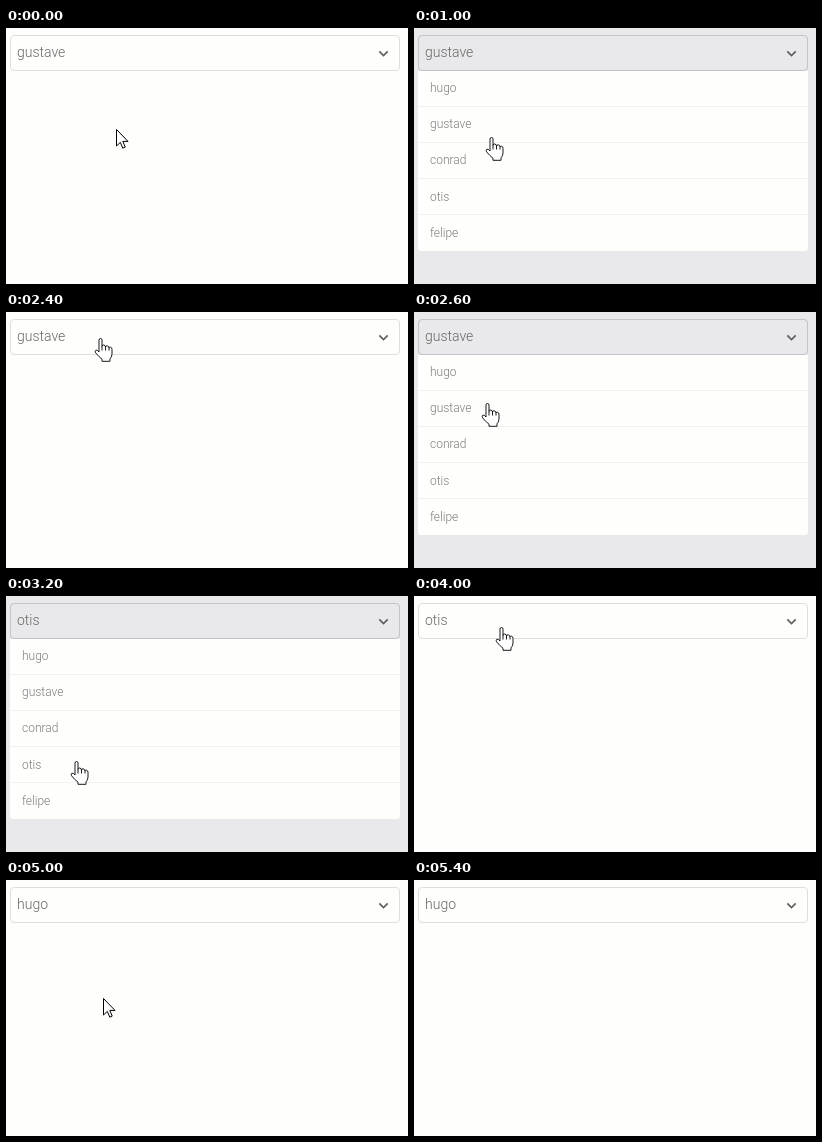
Recreate the animation shown at these times as an HTML page. Size 402 px wide and 256 px high, loop 6200 ms.

```html
<!DOCTYPE html>
<html lang="en">
<head>
<meta charset="utf-8">
<title>Select dropdown</title>
<style>
  html, body { margin: 0; width: 100%; height: 100%; overflow: hidden; background: #fefefd; }
  svg { display: block; width: 402px; height: 256px; }
  text { font-family: Roboto, "Open Sans", sans-serif; font-weight: 300; }
  #value { font-size: 14px; fill: #666; }
  #list text { font-size: 12px; fill: #7c7c7c; }
  .sep { stroke: #f1f1f1; }
  .frame { fill: none; stroke: #dededf; }
  #focus { stroke: #c4c4c7; }
  .cursor { fill: #fff; stroke: #000; stroke-linejoin: round; }
</style>
</head>
<body>
<svg viewBox="0 0 402 256">
  <rect width="402" height="256" fill="#fefefd"/>
  <rect class="menu" width="402" height="256" fill="#e9e9eb"/>
  <rect class="frame" x="4.5" y="7.5" width="389" height="35" rx="3.5"/>
  <rect class="frame menu" id="focus" x="4.5" y="7.5" width="389" height="35" rx="3.5"/>
  <text id="value" x="11" y="29"></text>
  <path d="M373.3 23.3l4.2 4.2 4.2-4.2" fill="none" stroke="#606060" stroke-width="1.7"/>
  <g class="menu" id="list">
    <path d="M4 43H394V220a3 3 0 0 1-3 3H7a3 3 0 0 1-3-3Z" fill="#fefefd"/>
  </g>
  <path id="arrow" class="cursor" d="M.5 .5V17L4.3 13.4 6.8 19.2 9.2 18.1 6.8 12.4H12Z"/>
  <path id="hand" class="cursor" stroke-width=".9" d="M-1 14V2Q-1 .5 .5 .5T2 2V8.5Q2 6.8 3.7 7T5.5 9Q5.5 7.6 7.2 7.8T9 10Q9.4 8.8 10.7 9.2T12 11.5V16Q11.8 19.3 10 20.8V23.3H2V21.2Q-1.5 18.5 -4.4 14.8Q-5.4 12.9 -4.1 12.2Q-2.6 11.7 -1 14ZM2 8.5V12.5M5.5 9V12.5M9 10V12.5"/>
</svg>
<script>
const LOOP = 6200, STEP = 200, ROW = 36;
const names = ["hugo", "gustave", "conrad", "otis", "felipe"];

// The menu fades in from open to full and out from pick to shut (ms)
const visits = [
  { open: 400, full: 800, pick: 1800, shut: 2200, row: 1 },
  { open: 2600, full: 2600, pick: 3200, shut: 3600, row: 3 },
  { open: 4000, full: 4400, pick: 4800, shut: 5000, row: 0 }
];

// Pointer stops, eased in between
const stops = [
  { at: 0, x: 110, y: 101 },
  { at: 400, x: 95, y: 30 },
  { at: 1000, x: 77, y: 109 },
  { at: 1800, x: 76, y: 97 },
  { at: 2400, x: 94, y: 26 },
  { at: 2600, x: 73, y: 91 },
  { at: 3200, x: 70, y: 165 },
  { at: 4000, x: 87, y: 31 },
  { at: 4800, x: 61, y: 65 },
  { at: 5400, x: 200, y: 270 }
];

const $ = id => document.getElementById(id);
const list = $("list"), value = $("value"), hand = $("hand"), arrow = $("arrow");

function add(tag, attrs) {
  const el = document.createElementNS("http://www.w3.org/2000/svg", tag);
  for (const key in attrs) el.setAttribute(key, attrs[key]);
  return list.appendChild(el);
}

names.forEach((name, i) => {
  add("text", { x: 16, y: Math.round(64 + i * ROW * 1.005) }).textContent = name;
  const y = 42.5 + i * ROW;
  if (i) add("line", { class: "sep", x1: 4, x2: 394, y1: y, y2: y });
});
const menuParts = document.querySelectorAll(".menu");

const ramp = (from, to, t) =>
  t >= to ? 1 : t <= from ? 0 : (t - from) / (to - from);

const menuOpacity = t =>
  Math.max(...visits.map(v => ramp(v.open, v.full, t) - ramp(v.pick, v.shut, t)));

function chosenRow(t) {
  const past = visits.filter(v => t >= v.pick);
  return (past.pop() || visits[0]).row;
}

function pointer(t) {
  const next = stops.findIndex(s => s.at > t);
  const b = stops.at(next), a = next > 0 ? stops[next - 1] : b;
  const p = ramp(a.at, b.at, t), k = p * p * (3 - 2 * p);
  return { x: Math.round(a.x + (b.x - a.x) * k), y: Math.round(a.y + (b.y - a.y) * k) };
}

function draw() {
  const t = Math.floor(performance.now() % LOOP / STEP) * STEP;
  const opacity = menuOpacity(t);
  const { x, y } = pointer(t);
  const clickable = opacity > 0 || y < 43;

  menuParts.forEach(el => el.setAttribute("opacity", opacity));
  value.textContent = names[chosenRow(t)];
  hand.setAttribute("visibility", clickable ? "visible" : "hidden");
  arrow.setAttribute("visibility", clickable ? "hidden" : "visible");
  for (const el of [hand, arrow]) el.setAttribute("transform", `translate(${x} ${y})`);
  requestAnimationFrame(draw);
}
draw();
</script>
</body>
</html>
```
